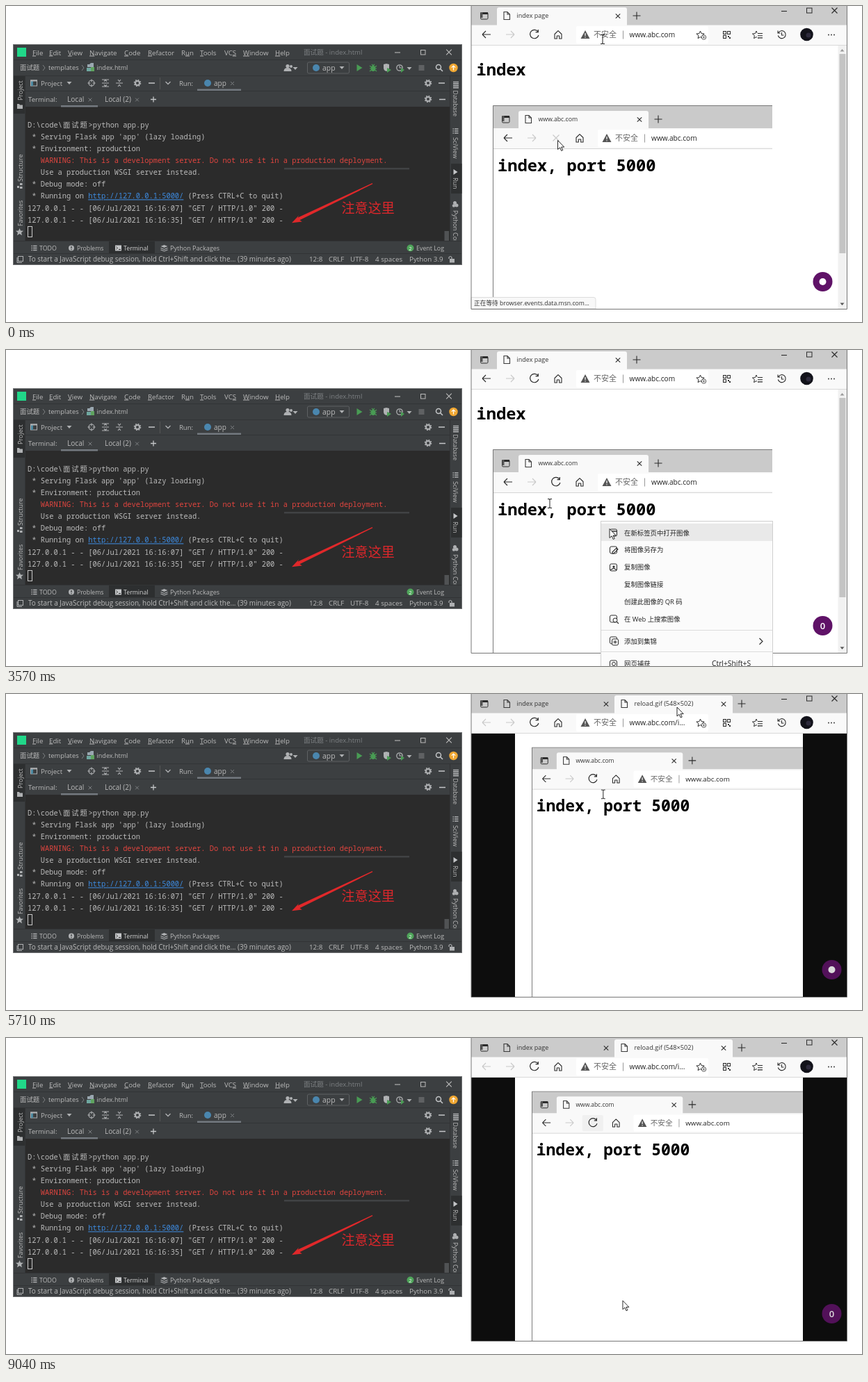
These frames come from a looping animation (1231x455 px, 9.14 s). An HTML page:

```html
<!DOCTYPE html>
<html lang="zh">
<head>
<meta charset="utf-8">
<title>Reload demo</title>
<style>
html, body { margin: 0; width: 100%; height: 100%; overflow: hidden; background: #fff; }
svg { display: block; width: 1231px; height: 455px; font-family: "Open Sans", "Noto Sans CJK SC", "Noto Sans CJK", sans-serif; }
text { white-space: pre; }
.mono { font-family: "Noto Sans Mono", "Noto Sans CJK SC", "DejaVu Sans Mono", monospace; }
.big { font-size: 23.7px; font-weight: 600; }
</style>
</head>
<body>
<svg id="stage" viewBox="0 0 1231 455" xmlns="http://www.w3.org/2000/svg"></svg>
<script>
const LOOP = 9140;

// Drawing helpers
const rect = (x, y, w, h, fill, more = '') => `<rect x="${x}" y="${y}" width="${w}" height="${h}" fill="${fill}" ${more}/>`;
const dot = (x, y, r, fill, more = '') => `<circle cx="${x}" cy="${y}" r="${r}" fill="${fill}" ${more}/>`;
const line = (d, color, w = 1.1, more = '') => `<path d="${d}" fill="none" stroke="${color}" stroke-width="${w}" ${more}/>`;
const shape = (d, fill, more = '') => `<path d="${d}" fill="${fill}" ${more}/>`;
const text = (x, y, s, size, fill, more = '') => `<text x="${x}" y="${y}" font-size="${size}" fill="${fill}" ${more}>${s}</text>`;
const group = (id, body, more = '') => `<g id="${id}" ${more}>${body}</g>`;
const cross = (x, y, r, color, w) => line(`M${x - r} ${y - r}l${2 * r} ${2 * r}m0 ${-2 * r}l${-2 * r} ${2 * r}`, color, w);
const plus = (x, y, r, color, w) => line(`M${x - r} ${y}h${2 * r}M${x} ${y - r}v${2 * r}`, color, w);
const caret = (x, y, color) => shape(`M${x - 3.5} ${y - 2}h7l-3.5 4z`, color);
const gear = (x, y) => dot(x, y, 3, 'none', 'stroke="#afb1b3" stroke-width="2"') +
  dot(x, y, 4.5, 'none', 'stroke="#afb1b3" stroke-width="1.6" stroke-dasharray="1.8 1.734"');
const list = (x, y, color) => line(`M${x} ${y - 3}h8m-8 3h8m-8 3h8`, color, 1.4, 'stroke-dasharray="1.5 1 5.5 0"');

function ide() {
  const bg = '#3c3f41', fg = '#bbbbbb', dim = '#7d8083', green = '#499c54', dark = '#2d2f30';
  let s = rect(10.5, 55.5, 645, 317, bg, 'stroke="#6e7072"') + rect(28, 145, 610, 193, '#2b2b2b') +
    rect(11, 101, 16.5, 54, dark) + rect(640, 227, 15.5, 43, dark) + rect(148, 339, 66, 17, dark) +
    line('M11 77.5H655M11 100.5H655M28 122.5H638M11 338.5H655M11 356.5H655M27.5 101V338M638.5 101V338', '#323436', 1);

  // title bar and menu
  s += rect(16, 60, 13, 13, '#21d789');
  const menu = [[38, 'File'], [62, 'Edit'], [89, 'View'], [120, 'Navigate'], [170, 'Code'], [204, 'Refactor'],
    [252, 'Run'], [279, 'Tools'], [314, 'VCS'], [341, 'Window'], [387, 'Help']];
  for (const [x, name] of menu) {
    const at = { VCS: 2, Run: 1 }[name] || 0;
    s += text(x, 70.5, name.slice(0, at) + `<tspan text-decoration="underline">${name[at]}</tspan>` + name.slice(at + 1), 9.7, fg);
  }
  s += text(428, 69.5, '面试题 - index.html', 9.6, dim) + line('M559 67h8', fg) +
    rect(596.5, 63.5, 6.5, 6.5, 'none', `stroke="${fg}"`) + cross(637, 66.5, 3.8, fg);

  // navigation bar
  s += text(20, 92, '面试题', 9.4, fg) + line('M53 85l3 4-3 4M109 85l3 4-3 4', dim, 1) +
    text(61, 92, 'templates', 9.4, fg) + shape('M117 84h3l2-2h4v6h-9z', '#9aa7b0') +
    rect(116, 89, 6, 5, '#6fa8a0') + rect(122, 88, 5, 6, '#5fa35f') + text(130.5, 92, 'index.html', 9.05, fg);
  s += dot(405, 86.5, 2.6, '#afb1b3') + shape('M399.500 94q0-5 5.500-5t5.500 5z', '#afb1b3') + dot(410, 87, 2, '#afb1b3') + caret(416, 90, '#afb1b3') +
    rect(433.5, 81, 60, 16, 'none', 'rx="2" stroke="#5e6163"') + dot(446, 89, 5, '#4a86ae') +
    text(455, 92.5, 'app', 10.4, fg) + caret(483, 89, '#afb1b3') + shape('M504.500 84l8 5-8 5z', green);
  s += `<ellipse cx="528" cy="90" rx="3.300" ry="4" fill="${green}"/>` +
    line('M523 86l10 8M533 86l-10 8M523 90h10M526 84l2 2 2-2', green, 1.2) +
    shape('M543 84l4-1 4 1v5q-1 4-4 5-4-1-4-5z', '#afb1b3') + shape('M548 89l6 3-6 4z', green) +
    dot(566, 89, 4.2, 'none', 'stroke="#afb1b3" stroke-width="1.300"') + line('M566 86v3h3', '#afb1b3') + shape('M568 89l5 3-5 4z', green) +
    caret(580, 90, '#afb1b3') + rect(593.5, 85, 8, 8, '#5f6163') + dot(622, 88, 3.5, 'none', 'stroke="#c4c6c8" stroke-width="1.500"') +
    line('M624.500 90.500l3.500 3.500', '#c4c6c8', 1.6) + dot(643.5, 89, 6.2, '#f0a732') + line('M643.500 92.500v-6.500m-2.700 2.700l2.700-2.700 2.700 2.700', '#fff', 1.2);

  // tool window headers
  s += rect(35.5, 107, 9, 8, 'none', 'stroke="#afb1b3"') + rect(36, 107, 3, 8, '#4a88a0') + rect(35, 106.5, 10, 2, '#afb1b3') +
    text(50, 114.5, 'Project', 9.6, fg) + caret(91, 111, '#afb1b3') + dot(123, 111, 4, 'none', 'stroke="#afb1b3" stroke-width="1.200"') +
    plus(123, 111, 5.5, '#afb1b3') + dot(123, 111, 1.8, bg) +
    line('M138 106h10m-10 10h10m-10-5h10M141 108.500l2-2 2 2m-4 5l2 2 2-2', '#afb1b3') +
    line('M158 111h10M161 106l2 2.500 2-2.500m-4 10l2-2.500 2 2.500', '#afb1b3') + gear(189, 111) + line('M205 111h9', '#c4c6c8', 1.5) +
    line('M221.500 103v17', '#555', 1) + line('M229.500 109l3.500 3.500 3.500-3.500', '#afb1b3', 1.3) +
    text(249, 114.5, 'Run:', 9.5, fg) + dot(290, 111, 5, '#4a86ae') + text(299, 114.5, 'app', 10, fg) +
    cross(325.5, 111.5, 2.4, dim, 1) + rect(275, 119.5, 63, 2.5, '#747a80') + gear(607, 111) + line('M622 111h9', '#c4c6c8', 1.5);
  s += text(32, 137.5, 'Terminal:', 9.6, fg) + text(88, 137.5, 'Local', 10.1, fg) + cross(121, 135, 2.4, dim, 1) +
    rect(79, 143, 53, 2.5, '#747a80') + text(142, 137.5, 'Local (2)', 9.9, fg) + cross(188.5, 135, 2.4, dim, 1) +
    plus(212, 134.5, 4, '#c4c6c8', 1.3) + gear(607, 134) + line('M623 134.500h9', '#c4c6c8', 1.5);

  // terminal output
  const row = i => (174.5 + 17.15 * i).toFixed(1);
  const out = (x, i, str, fill = '#bbbbbb') => text(x, row(i), str, 10.4, fill, 'class="mono"');
  s += out(31, 0, 'D:\\code\\') + text(82, row(0), '面试题', 10.4, fg, 'class="mono" letter-spacing="1.8"') + out(118.5, 0, '&gt;python app.py');
  s += out(37.2, 1, "* Serving Flask app 'app' (lazy loading)") + out(37.2, 2, '* Environment: production') +
    out(49.7, 3, 'WARNING: This is a development server. Do not use it in a production deployment.', '#e0453f') +
    out(49.7, 4, 'Use a production WSGI server instead.') + out(37.2, 5, '* Debug mode: off') + out(37.2, 6, '* Running on') +
    out(118.2, 6, '<tspan text-decoration="underline">http://127.0.0.1:5000/</tspan>', '#3d8be0') + out(261.5, 6, '(Press CTRL+C to quit)');
  ['07', '35'].forEach((sec, i) => s += out(31, 7 + i, `127.0.0.1 - - [06/Jul/2021 16:16:${sec}] "GET / HTTP/1.0" 200 -`));
  s += rect(31.5, 317.5, 6, 15, 'none', 'stroke="#c8c8c8"') + rect(400, 233, 180, 2.5, '#414345') + rect(630.5, 324, 6.5, 14, '#505254');
  s += shape('M526.700 255L419.500 304.800 421.200 301.600 411 312.300 425.800 310.600 422.400 308.300 527.300 256.300z', '#e0282a') +
    text(482.5, 297.5, '注意这里', 19.1, '#dd272b');

  // side bars
  const side = (x, y, str, deg, size = 8.9) => text(0, 0, str, size, fg, `transform="translate(${x} ${y}) rotate(${deg})"`);
  s += side(23.5, 136, 'Project', -90) + shape('M16 141h3l1 1.500h4v5.500h-8z', '#afb1b3') + side(23.5, 253, 'Structure', -90, 9.2) +
    rect(16, 259, 3, 3, '#afb1b3') + rect(20, 255, 3.5, 3, '#afb1b3') + rect(20, 260, 3.5, 3, '#afb1b3') + side(23.5, 317, 'Favorites', -90, 8.8) +
    shape('M19.500 320l1.500 3.500 4 .300-3 2.500 1 4-3.500-2.200-3.500 2.200 1-4-3-2.500 4-.300z', '#afb1b3');
  s += line('M643 109.500h8m-8 2.700h8m-8 2.700h8m-8 2.700h8', '#afb1b3', 1.7) + side(643, 121.5, 'Database', 90, 8.5) + list(642.5, 180, '#afb1b3') +
    side(643, 189, 'SciView', 90) + shape('M643.500 235l6 4-6 4z', '#c4c6c8') + side(643, 247, 'Run', 90) +
    dot(645.5, 283.5, 2.5, '#afb1b3') + dot(648, 287, 2.5, '#afb1b3') + dot(644, 287.5, 2.2, '#afb1b3') +
    `<svg x="640" y="292" width="15" height="46">${text(0, 0, 'Python Con', 9, fg, 'transform="translate(3 2) rotate(90)"')}</svg>`;

  // bottom bars
  s += list(36.5, 348.5, '#afb1b3') + text(48, 352, 'TODO', 8.8, fg) + dot(94, 348.5, 4, '#afb1b3') + line('M94 346v3m0 1v1.200', bg, 1.3) +
    text(102, 352, 'Problems', 8.7, fg) + rect(157, 344.5, 9, 8, '#c4c6c8') + line('M158.500 346.500l2 2-2 2m3.500 0h3', '#333', 1) +
    text(169, 352, 'Terminal', 8.75, '#d4d4d4') + shape('M227.500 344l5 2-5 2-5-2z', '#afb1b3') + line('M222.500 348.500l5 2 5-2m-10 2.500l5 2 5-2', '#afb1b3') +
    text(236, 352, 'Python Packages', 9.05, fg) + dot(581.5, 348.5, 5, '#4fa55a') + text(579.3, 351.5, '2', 7.5, '#fff') + text(590, 352, 'Event Log', 8.9, fg);
  s += group('hoverStatus', rect(576, 357, 56, 15, '#4c5052')) + rect(17.5, 360.5, 7, 7, 'none', 'stroke="#afb1b3"') + line('M16 362v7.500h7', '#afb1b3', 1) +
    text(32, 368.4, 'To start a JavaScript debug session, hold Ctrl+Shift and click the... (39 minutes ago)', 9.93, fg);
  for (const [x, str] of [[436, '12:8'], [464, 'CRLF'], [495, 'UTF-8'], [531, '4 spaces'], [580, 'Python 3.9']]) s += text(x, 368.4, str, 9.8, fg);
  return s + rect(638, 364, 7, 5.5, '#afb1b3') + line('M637 364v-2q2-3 4 0v2', '#afb1b3', 1.2);
}

// Browser pieces shared by the window and the recording inside it
const ink = '#2b2b2b', pale = '#c9c9c9';
const page = (x, y) => line(`M${x - 4} ${y - 5.5}h5l3.500 3.500v7.500h-8.500zm5 0v3.500h3.500`, '#3a3a3a');
const arrow = (x, dir, color) => line(`M${x - 6} 41h12M${x + dir * 6} 41l${-dir * 5}-5m${dir * 5} 5l${-dir * 5} 5`, color, 1.1);
const reload = line('M765 37a6.200 6.200 0 1 0 .900 5M765.300 34v3.700h-3.700', ink, 1.2);
const stop = cross(760, 41, 4.5, pale, 1.1);
const tools = rect(682.5, 9.5, 10.5, 9.5, 'none', `stroke="${ink}" rx="1.500"`) + rect(682.5, 9, 10.5, 3, ink) + rect(682.5, 9, 3, 8, '#555');
const home = line('M789 47v-6.500l5-4.800 5 4.800v6.500h-3.300v-4h-3.400v4z', ink, 1.1, 'stroke-linejoin="round"');
const warning = shape('M833 35l6.500 12h-13z', '#555') + line('M833 39v4m0 1.200v1.300', '#fff', 1.2) + text(845, 45.2, '不安全', 11, '#666') + line('M887.500 35.500v12', '#999', 1);
const activeTab = (x, w) => shape(`M${x} 28V5q0-3 3-3h${w - 6}q3 0 3 3v23z`, '#f9f9f9');

function recording() {
  const chrome = tools + activeTab(706, 187) + page(720, 14) + text(734.5, 17.2, 'www.abc.com', 8.75, '#333') + cross(880, 14.5, 3.2, ink) +
    plus(907, 14, 5.5, ink) + rect(669, 27, 420, 29, '#f9f9f9') + rect(820, 29, 270, 25, '#fff', 'rx="2"') +
    group('hover', rect(744, 29.5, 31, 24, '#d9d9d9', 'rx="2"')) + arrow(691, -1, ink) + arrow(725, 1, pale) +
    group('reload', reload) + group('stop', stop) + home + warning + text(897, 45, 'www.abc.com', 10.15, '#222') + line('M669 56.500h420', '#d5d5d5', 1);
  return rect(0, 0, 402, 400, '#fff') + rect(0, 0, 402, 33, '#cacaca') + `<g transform="translate(-669 6)">${chrome}</g>` +
    `<text id="port" class="mono big" x="7" y="95"></text>` + line('M.500 400V.500H402', '#777', 1) + group('innerCursor', '');
}

function browser() {
  let s = rect(669, 0, 540, 436, '#fff') + rect(669, 0, 540, 28, '#cbcbcb') + tools;
  s += group('tabOne', activeTab(706, 187) + cross(880, 14.5, 3.2, ink) + plus(907, 14, 5.5, ink));
  s += group('tabTwo', group('firstOn', activeTab(706, 169)) + group('secondOn', activeTab(875, 170)) +
    cross(863, 14.5, 3.2, ink) + cross(1032, 14.5, 3.2, ink) + plus(1058, 14, 5.5, ink) +
    group('spinner', dot(886, 16, 1.2, '#444')) + group('tabIcon', page(889, 14)) + '<text id="tabText" x="903.500" y="17.200" font-size="9.200" fill="#333"></text>');
  s += page(720, 14) + text(734.5, 17.2, 'index page', 9, '#333') +
    line('M1115 7.500h8', ink) + rect(1151.5, 3, 7.5, 7, 'none', `stroke="${ink}"`) + cross(1191.5, 6.5, 4, ink) +
    rect(669, 27.5, 540, 28.5, '#f9f9f9') + rect(820, 29, 190, 25, '#fff', 'rx="2"') + line('M669 56.500h540', '#d9d9d9', 1) +
    group('backOn', arrow(691, -1, ink)) + group('backOff', arrow(691, -1, pale)) + arrow(725, 1, pale) + reload + home + warning +
    '<text id="address" x="896.500" y="45" font-size="10.150" fill="#222"></text>';
  const star = (x, y) => line(`M${x} ${y - 5.5}l1.600 3.600 4 .400-3 2.600.800 4-3.400-2-3.400 2 .800-4-3-2.600 4-.400z`, ink, 1);
  s += star(998.5, 41.5) + dot(1003.5, 45, 3.2, '#fff', 'stroke="#555"') + plus(1003.5, 45, 1.6, '#555', 0.9);
  for (const [x, y] of [[1031, 36], [1037, 36], [1031, 42]]) s += rect(x + 0.5, y + 0.5, 4, 4, 'none', `stroke="${ink}"`);
  s += rect(1038, 43, 2, 2, ink) + rect(1040, 45, 2, 2, ink) + star(1079, 41.5) + rect(1080, 38.5, 9, 8, '#f9f9f9') + line('M1081 39.500h7m-7 3.200h7m-7 3.200h7', ink) +
    line('M1110.800 38.500a5.500 5.500 0 1 1-.500 4M1110 35.500v3.500h3.500M1115.500 38v4h3', ink) + dot(1151.5, 41, 9.3, '#12121a') + dot(1154, 42, 3.5, '#2d2a3c');
  for (const x of [1183, 1187, 1191]) s += dot(x, 41.5, 0.9, ink);

  s += group('indexPage', text(676.5, 99.6, 'index', 23.7, '#000', 'class="mono big"') + rect(1196.5, 57, 12.5, 379, '#f1f1f1') +
    rect(1198.5, 69, 9, 287, '#c4c4c4') + shape('M1199.500 65.500l3-3.500 3 3.500z', '#999') + shape('M1199.500 427.500h6l-3 3.500z', '#555'));
  s += group('imagePage', rect(669, 57, 540, 379, '#0d0d0d') + rect(732, 57, 414, 379, '#fff'));
  s += '<clipPath id="view"><rect x="669" y="57" width="540" height="379"/></clipPath><clipPath id="crop"><rect width="402" height="400"/></clipPath>' +
    `<g clip-path="url(#view)"><g id="recording" clip-path="url(#crop)">${recording()}</g></g>`;
  s += group('waiting', shape('M669 419.500h176q3 0 3 3V436H669z', '#f8f8f8', 'stroke="#ddd"') + text(673, 431.2, '正在等待 browser.events.data.msn.com...', 8.7, '#333'));
  s += group('badge', dot(0, 0, 14, '#5f1267') + group('mark', dot(0, 0, 5, '#fff')) + group('zero', text(0, 4.5, '0', 13, '#fff', 'text-anchor="middle" font-weight="600"')));
  return s + line('M669 0V436.500H1209.500V0', '#777', 1);
}

function menu() {
  const rows = ['在新标签页中打开图像', '将图像另存为', '复制图像', '复制图像链接', '创建此图像的 QR 码', '在 Web 上搜索图像'];
  let s = rect(855.5, 246.5, 247, 220, '#fbfbfb', 'stroke="#cfcfcf"') + rect(856, 250, 246, 25, '#e9e9e9');
  rows.forEach((label, i) => s += text(889, 266.5 + 24.9 * i, label, 9.4, '#222'));
  const frame = y => rect(868.5, y - 5, 10, 10, 'none', `rx="2" stroke="${ink}"`);
  s += frame(263) + line('M868 261h10', ink, 1.4) + frame(288) + line('M872 291l6-6 2 2-6 6h-2z', ink) +
    frame(313) + dot(874, 312, 1.6, ink) + line('M869 317l5-3 4 3', ink) + frame(387) + dot(876, 389, 3, '#fff', `stroke="${ink}"`) + line('M878 391l3 3', ink);
  s += line('M856 403.500h246M856 434.500h246', '#dcdcdc', 1) + frame(418) + rect(871.5, 416, 9, 9, '#fbfbfb', `rx="2" stroke="${ink}"`) + plus(876, 420.5, 2.5, ink) +
    text(889, 423, '添加到集锦', 9.4, '#222') + line('M1083.500 415l4.500 4.500-4.500 4.500', ink) +
    frame(452) + dot(874, 452, 2.5, 'none', `stroke="${ink}"`) + text(889, 454.7, '网页捕获', 9.4, '#222') + text(1015, 455, 'Ctrl+Shift+S', 10.3, '#222');
  return s;
}

const cursors = {
  arrow: shape('M0 0V13L3.100 10.300 5.200 15 7.200 14.100 5.100 9.600H9.200Z', '#fff', 'stroke="#111" stroke-width=".9"'),
  beam: line('M-3-6.500h2q1 0 1 1 0-1 1-1h2M0-6v12M-3 6.500h2q1 0 1-1 0 1 1 1h2', '#222', 1),
  zoom: dot(-1, -1, 4, '#fff', 'stroke="#111" stroke-width="1.400"') + plus(-1, -1, 2.2, '#111', 1.2) + line('M2 2l4 4', '#111', 2.2)
};

document.getElementById('stage').innerHTML = rect(0, 0, 1231, 455, '#fff') + ide() + browser() + group('menu', menu()) + group('cursor', '');

// Motion tables: [time, x, y, kind]
const outerPath = [[0, 858, 48, 'beam'], [300, 842, 90, 'arrow'], [600, 770, 190, 'arrow'], [800, 700, 285, 'arrow'], [1050, 650, 345, 'arrow'],
  [1200, 605, 366, 'arrow'], [1330, 586.5, 371, 'arrow'], [1590, 586.5, 371, 'arrow'], [1740, 565, 372, 'arrow'], [2160, 715, 305, 'arrow'],
  [2700, 855, 247, 'arrow'], [2900, 855, 247, 'arrow'], [3320, 868, 257.5, 'arrow'], [4020, 868, 257.5, 'arrow'], [4610, 951.5, 262.5, 'arrow'],
  [4740, 951.5, 262.5, 'arrow'], [5560, 965, 19, 'arrow'], [5840, 965, 19, 'arrow'], [6100, 940, 75, 'zoom'], [6640, 862, 189, 'zoom'],
  [7960, 862, 189, 'zoom'], [8500, 1142, 300, 'zoom'], [8600, 1142, 300, ''], [LOOP, 1142, 300, '']];
const innerPath = [[0, 93.5, 50.5, 'arrow'], [140, 95, 49, 'arrow'], [3200, 95, 49, 'arrow'], [3440, 82, 78, 'beam'], [3600, 82, 78, 'arrow'],
  [4020, 130, 205, 'arrow'], [4600, 130, 300, ''], [4880, 110, 150, 'arrow'], [5200, 95, 49, 'arrow'], [5700, 106, 70, 'beam'], [5850, 106, 70, 'arrow'],
  [6200, 95, 49, 'arrow'], [7100, 95, 49, 'arrow'], [7280, 91, 57.7, 'arrow'], [7440, 91, 57.7, 'arrow'], [7600, 95, 49, 'arrow'],
  [8600, 95, 49, 'arrow'], [8770, 70, 121, 'arrow'], [8890, 100, 215, 'arrow'], [9040, 135, 311, 'arrow']];
// [time, port, loading]
const loads = [[0, 5000, 1], [270, 5001, 0], [660, 5001, 1], [790, 5000, 0], [1200, 5000, 1], [1330, 5001, 0], [1870, 5001, 1], [2010, 5000, 0],
  [2560, 5000, 1], [2690, 5001, 0], [2940, 5001, 1], [3060, 5000, 0], [5200, 5000, 1], [5330, 5001, 0], [5700, 5000, 0], [6500, 5000, 1],
  [6630, 5001, 0], [7560, 5001, 1], [7690, 5000, 0]];
const bursts = [[140, 1050, 8], [1200, 2160, 8], [2310, 3320, 9], [3450, 4020, 5], [4610, 5560, 8], [5710, 6640, 8], [6760, 7690, 8], [7830, 8770, 8], [8890, 9040, 2]];
const ticks = [0, ...bursts.flatMap(([a, b, n]) => Array.from({ length: n }, (_, i) => a + (b - a) * i / (n - 1)))];

const last = (rows, t) => rows.findLastIndex(r => r[0] <= t);
function along(path, t) {
  const i = last(path, t), a = path[i], b = path[i + 1] || a;
  const k = b === a ? 0 : (t - a[0]) / (b[0] - a[0]);
  return { x: a[1] + (b[1] - a[1]) * k, y: a[2] + (b[2] - a[2]) * k, kind: a[3] };
}

const el = id => document.getElementById(id);
const show = (id, on) => { el(id).style.display = on ? '' : 'none'; };
const move = (id, x, y, scale = 1) => el(id).setAttribute('transform', `translate(${x} ${y}) scale(${scale})`);
const fade = (id, value) => el(id).setAttribute('opacity', value);
function place(id, p) {
  el(id).innerHTML = cursors[p.kind] || '';
  move(id, p.x, p.y);
}

function draw(t) {
  const image = t >= 5710, two = t >= 4610, titled = t >= 5130;
  show('indexPage', !image); show('imagePage', image);
  show('tabOne', !two); show('tabTwo', two); show('firstOn', !image); show('secondOn', image);
  show('spinner', !titled); show('tabIcon', titled);
  el('tabText').textContent = titled ? 'reload.gif (548×502)' : '正在加载...';
  show('backOn', !image); show('backOff', image);
  el('address').textContent = image ? 'www.abc.com/i...' : 'www.abc.com';
  image ? move('recording', 756, 76.5, 0.97) : move('recording', 700, 143);

  const zero = (t >= 1880 && !image) || t >= 7000;
  move('badge', image ? 1187.5 : 1174.5, 397);
  fade('badge', image ? 0.85 : 1);
  show('zero', zero); show('mark', !zero);
  show('waiting', t < 520); show('menu', t >= 2800 && t < 4610); show('hoverStatus', t >= 1330 && t < 1600);

  const [, port, loading] = loads[last(loads, t)];
  const p = along(innerPath, t);
  el('port').textContent = 'index, port ' + port;
  show('stop', loading); show('reload', !loading);
  show('hover', !loading && (t >= 8700 || (p.kind === 'arrow' && p.x > 75 && p.y < 56)));
  fade('hover', image ? 0.3 : 1);
  place('innerCursor', p);
  fade('innerCursor', t >= 7280 && t < 7440 ? 0.65 : 1);
  place('cursor', along(outerPath, t));
}

const start = performance.now();
let shown = -1;
function frame() {
  const t = (performance.now() - start) % LOOP;
  const tick = ticks.findLast(v => v <= t + 0.5);
  if (tick !== shown) draw(shown = tick);
  requestAnimationFrame(frame);
}
frame();
</script>
</body>
</html>
```
